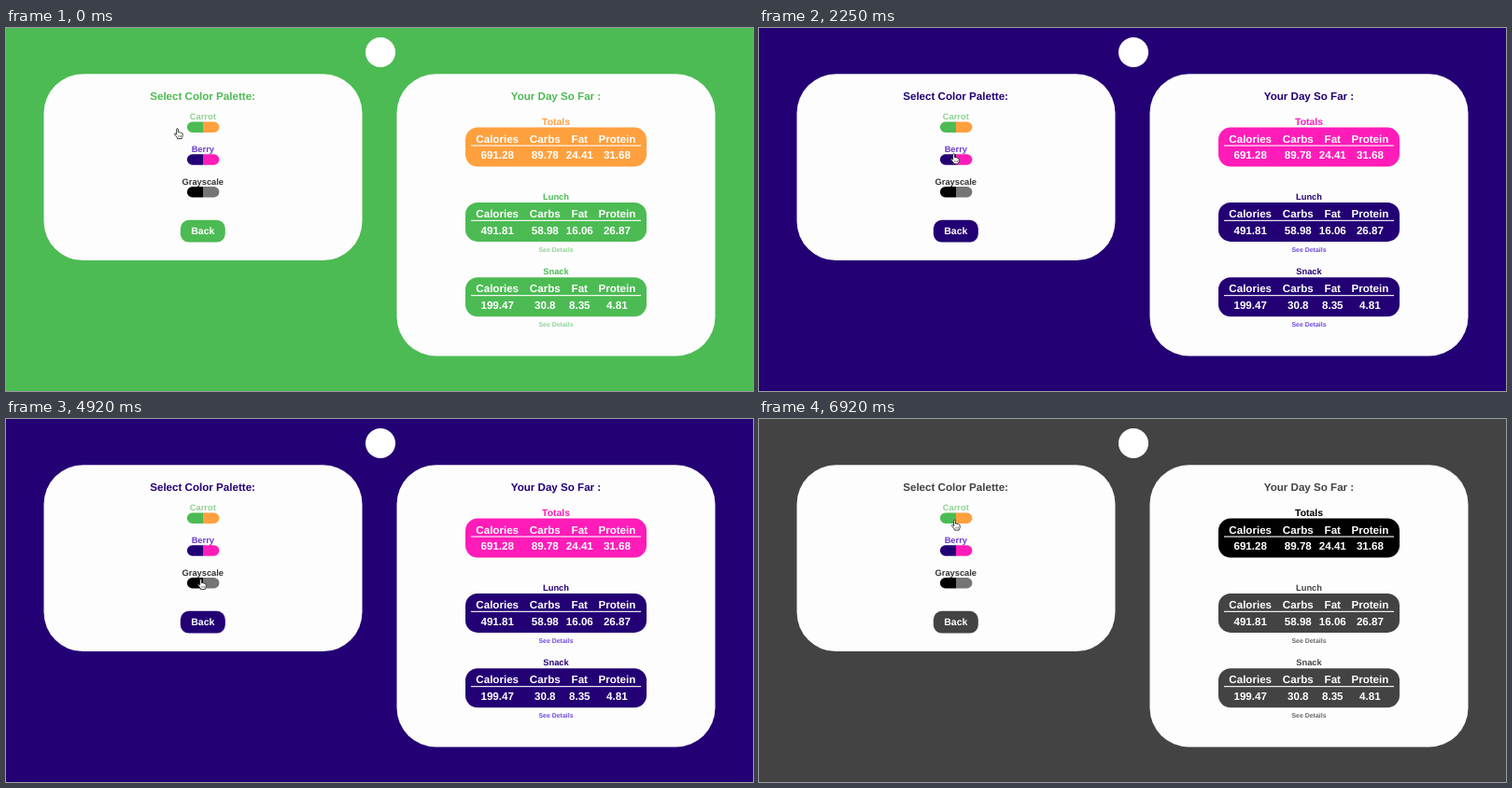
An HTML page for the animation above (7.01 s loop, 800 by 389 pixels).

```html
<!DOCTYPE html>
<html lang="en">
<head>
<meta charset="utf-8">
<title>Color palette picker</title>
<style>
  html, body { margin: 0; width: 100%; height: 100%; overflow: hidden; }
  svg { display: block; width: 800px; height: 389px; background: var(--main); }
  text {
    font-family: "Liberation Sans", Arial, sans-serif;
    font-weight: 700;
    text-anchor: middle;
    text-rendering: geometricPrecision;
  }
  .main { fill: var(--main); }
  .accent { fill: var(--accent); }
  .soft { fill: var(--soft); }
  .white { fill: #fff; }
  .panel { fill: #fdfdfd; }
</style>
</head>
<body>
<svg id="stage" viewBox="0 0 800 389" xmlns="http://www.w3.org/2000/svg"></svg>
<script>
const LOOP = 7010, STEP = 1000 / 12, LAST = 83;

// First step of each theme, then its colours.
const themes = [
  { from: 0, main: '#4cbb53', accent: '#ffa03e', soft: '#8fd294' },
  { from: 27, main: '#230074', accent: '#ff1cb8', soft: '#7148de' },
  { from: 60, main: '#434343', accent: '#000000', soft: '#686868' }
];

const swatches = [
  ['Carrot', '#8fd294', '#4cbb53', '#ffa03e'],
  ['Berry', '#6a38cc', '#230074', '#ff1cb8'],
  ['Grayscale', '#333333', '#000000', '#757575']
];

const columns = [['Calories', 526.2], ['Carbs', 577.3], ['Fat', 614.3], ['Protein', 654.4]];

// Pointer stops: step, x, y.
const path = [
  [0, 185, 113], [10, 185, 113], [22, 210, 140], [30, 210, 140],
  [41, 210, 147], [44, 210, 147], [55, 210, 177], [72, 210, 177],
  [76, 180, 146], [81, 211, 113.5], [LAST, 211, 113.5]
];

const rect = (x, y, w, h, r, cls) =>
  `<rect x="${x}" y="${y}" width="${w}" height="${h}" rx="${r}" class="${cls}"/>`;

const label = (str, x, y, size, cls, fill) =>
  `<text x="${x}" y="${y}" font-size="${size}" class="${cls}"${fill ? ` style="fill:${fill}"` : ''}>${str}</text>`;

function swatch([name, ink, left, right], i) {
  const y = 100.6 + i * 34.7;
  return label(name, 210.8, y - 2.3, 9.3, '', ink) +
    `<path d="M211 ${y}h-11.4a5.7 5.7 0 0 0 0 11.4h11.4z" fill="${left}"/>` +
    `<path d="M211 ${y}h11.7a5.7 5.7 0 0 1 0 11.4h-11.7z" fill="${right}"/>`;
}

function table(title, y, cls, size, values) {
  const cells = columns.map(([head, x], i) =>
    label(head, x, y + 16.2, 11.6, 'white') +
    label(values[i], x, y + 33.6, 11.6, 'white')).join('');
  return label(title, 589, y - 2.9, size, cls) +
    rect(492, y, 194, 42, 13, cls) +
    rect(498, y + 18.9, 182, 1.1, 0, 'white') + cells;
}

const meal = (title, y, values) =>
  table(title, y, 'main', 9.3, values) + label('See Details', 589, y + 52.6, 6.95, 'soft');

const stage = document.getElementById('stage');
stage.innerHTML =
  '<circle cx="401" cy="26" r="16" class="white"/>' +
  rect(40.5, 49.3, 341, 199.8, 42, 'panel') +
  rect(418.5, 49.3, 341, 302.2, 42, 'panel') +
  label('Select Color Palette:', 210.6, 77, 11.6, 'main') +
  swatches.map(swatch).join('') +
  rect(186.8, 205.8, 48, 23.8, 9, 'main') +
  label('Back', 210.8, 221.2, 10.5, 'white') +
  label('Your Day So Far :', 589, 77, 11.6, 'main') +
  table('Totals', 106.6, 'accent', 10.4, ['691.28', '89.78', '24.41', '31.68']) +
  meal('Lunch', 186.9, ['491.81', '58.98', '16.06', '26.87']) +
  meal('Snack', 267.2, ['199.47', '30.8', '8.35', '4.81']) +
  `<g id="pointer"><path d="M-2.4 1.2V-4.2Q-2.4-5.3-1.5-5.3T-.6-4.2V-1.2
    Q.4-2 1.1-1Q2.1-1.6 2.7-.5Q4.2-.9 4.2.8V2.6Q4.2 3.8 3.3 4.6V5.6H-1.6V4.6
    L-4.4 1Q-4.7-.2-3.6-.1Z" fill="#fff" stroke="#222" stroke-width=".85" stroke-linejoin="round"/>
    <path d="M-.3 2v2M1.1 2v2M2.5 2v2" stroke="#333" stroke-width=".5"/></g>`;
const pointer = document.getElementById('pointer');

function pointerAt(n) {
  const i = Math.max(1, path.findIndex(p => p[0] >= n));
  const [a, x0, y0] = path[i - 1], [b, x1, y1] = path[i];
  const k = (n - a) / (b - a), e = k * k * (3 - 2 * k);
  return [x0 + (x1 - x0) * e, y0 + (y1 - y0) * e];
}

let shown = -1;
function draw(now) {
  const n = Math.min(LAST, Math.floor((now % LOOP + 4) / STEP));
  if (n !== shown) {
    shown = n;
    const theme = themes.filter(t => t.from <= n).pop();
    for (const key of ['main', 'accent', 'soft']) stage.style.setProperty('--' + key, theme[key]);
    pointer.setAttribute('transform', `translate(${pointerAt(n)})`);
  }
  requestAnimationFrame(tick);
}

const start = performance.now();
function tick() { draw(performance.now() - start); }
tick();
</script>
</body>
</html>
```
